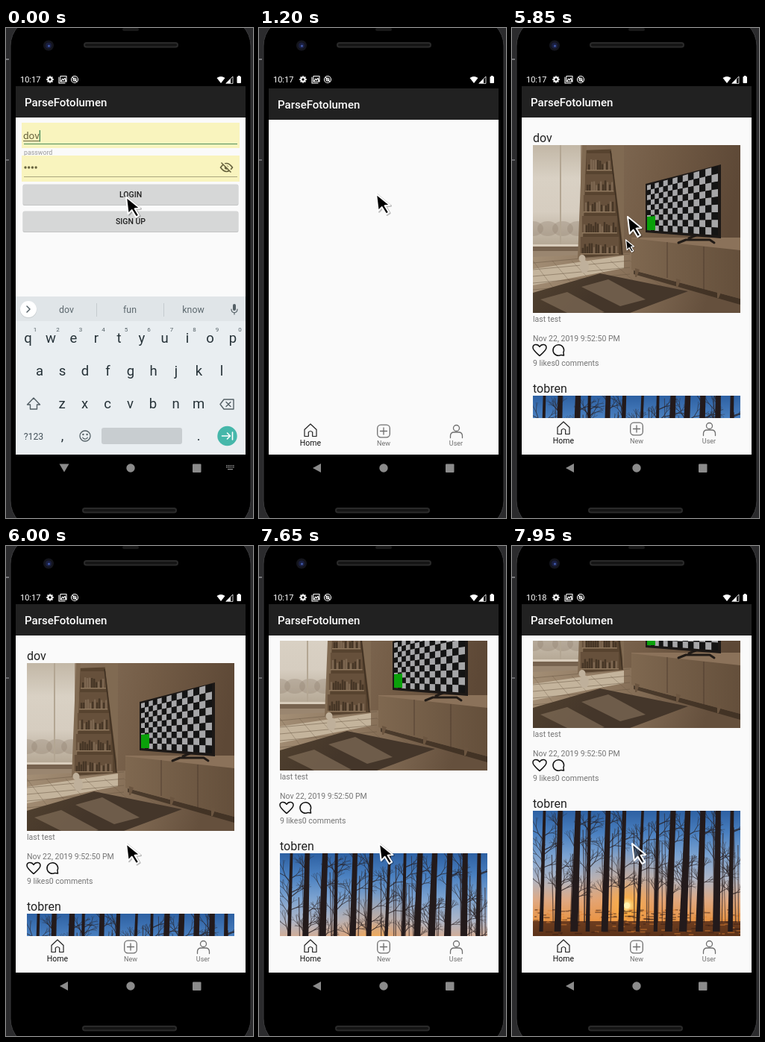
An HTML page with a canvas for the animation above (8000 ms loop, 331 by 657 pixels).

```html
<!DOCTYPE html>
<html lang="en">
<head>
<meta charset="utf-8">
<title>ParseFotolumen</title>
<style>
html, body { margin: 0; width: 100%; height: 100%; overflow: hidden; background: #000; }
canvas { display: block; width: 331px; height: 657px; }
</style>
</head>
<body>
<canvas id="stage" width="331" height="657"></canvas>
<script>
const LOOP = 8000;
const USER = 'dov', FRIEND = 'tobren', APP = 'ParseFotolumen';
const IMG_W = 278, IMG_H = 225;
const stage = document.getElementById('stage').getContext('2d');
let c = stage;

const mix = (a, b, t) => a + (b - a) * t;

function seeded(seed) {
  return () => {
    seed = (seed * 16807) % 2147483647;
    return seed / 2147483647;
  };
}

function repeat(n, fn) {
  for (let i = 0; i < n; i++) fn(i);
}

function box(x, y, w, h, fill, r = 0) {
  c.fillStyle = fill;
  c.beginPath();
  c.roundRect(x, y, w, h, r);
  c.fill();
}

// Four-sided face with upright left and right edges.
function face(fill, x0, top0, end0, x1, top1, end1) {
  c.fillStyle = fill;
  c.beginPath();
  c.moveTo(x0, top0);
  c.lineTo(x1, top1);
  c.lineTo(x1, end1);
  c.lineTo(x0, end0);
  c.fill();
}

function line(color, width, x0, y0, x1, y1) {
  c.strokeStyle = color;
  c.lineWidth = width;
  c.beginPath();
  c.moveTo(x0, y0);
  c.lineTo(x1, y1);
  c.stroke();
}

function disc(x, y, r, fill) {
  c.fillStyle = fill;
  c.beginPath();
  c.arc(x, y, r, 0, 7);
  c.fill();
}

function ring(x, y, r, color, width, a = 0, b = 2 * Math.PI) {
  c.strokeStyle = color;
  c.lineWidth = width;
  c.beginPath();
  c.arc(x, y, r, a, b);
  c.stroke();
}

function path(d, x, y, color, width, fill) {
  const p = new Path2D(d);
  c.save();
  c.translate(x, y);
  c.lineJoin = c.lineCap = 'round';
  if (fill) { c.fillStyle = fill; c.fill(p); }
  if (width) { c.strokeStyle = color; c.lineWidth = width; c.stroke(p); }
  c.restore();
}

function text(s, x, y, size, color, align = 'left', weight = 400) {
  c.font = `${weight} ${size}px Roboto, sans-serif`;
  c.textAlign = align;
  c.fillStyle = color;
  c.fillText(s, x, y);
}

function fade(x0, y0, x1, y1, ...colors) {
  const g = c.createLinearGradient(x0, y0, x1, y1);
  colors.forEach((col, i) => g.addColorStop(i / (colors.length - 1), col));
  return g;
}

function picture(draw) {
  const cv = document.createElement('canvas');
  cv.width = IMG_W;
  cv.height = IMG_H;
  c = cv.getContext('2d');
  draw();
  c = stage;
  return cv;
}

function drawWindow() {
  box(0, 0, 69, 150, '#9a8670');
  box(0, 0, 64, 134, fade(0, 0, 0, 134, '#c2b7a6', '#d9d1c4', '#d6cdc0', '#b5a895'));
  repeat(4, i => {
    c.fillStyle = 'rgba(140,124,106,.3)';
    c.beginPath();
    c.ellipse(i * 20, 112, 14, 10, 0, 0, 7);
    c.fill();
  });
  box(36, 0, 2, 134, '#b3a693');
  box(0, 133, 68, 3, '#d8ccbb');
  box(0, 136, 68, 6, '#77634f');
}

function drawFloor() {
  face(fade(0, 145, 230, 220, '#a38e75', '#8a735b', '#65503d'), 0, 150, IMG_H, IMG_W, 138, IMG_H);
  face('#c4b49c', 0, 166, 188, 122, 148, 165);
  repeat(6, i => {
    line('rgba(105,86,67,.5)', 1, 0, 158 + i * 9, 130, 146 + i * 9);
    line('rgba(105,86,67,.35)', 1, i * 26, 155, 30 + i * 30, 195);
  });
  path('M0 198 L90 172 L208 196 L130 225 H0 Z', 0, 0, '', 0, fade(0, 172, 60, 225, '#51412f', '#44362a'));
  repeat(2, i => path('M0 0 L36 -10 L86 17 L52 26 Z', 10 + i * 55, 207 - i * 17, '', 0, 'rgba(133,113,91,.65)'));
}

function drawShelf(rnd) {
  face('#57432f', 66, 7, 151, 120, 5, 147);
  c.save();
  // the sides lean together towards the top
  const side = (y, s) => 88 + s * mix(16, 29, y / 150);
  path('M66 0 H72 L66 152 H60 Z M104 0 H122 V148 Z', 0, 0, '', 0, '#806a52');
  repeat(5, i => {
    const y = 33 + i * 28, l = side(y, -0.85), r = side(y, 0.95);
    box(l, y - 22, r - l, 22, '#66503b');
    for (let x = l + 2; x < r - 3; x += 3) {
      const h = 7 + rnd() * 7;
      box(x, y - h, 2.4, h, rnd() < 0.6 ? '#463626' : '#7d6751');
    }
    line('#8f785e', 1.6, l, y + 0.8, r, y + 0.8);
  });
  line('#3f3022', 1.5, 104, 8, 120, 147);
  c.restore();
}

function drawCabinet() {
  face('rgba(52,39,28,.7)', 135, 168, 173, IMG_W, 206, 214);
  face('#8b725a', 132, 124, 126, IMG_W, 124, 142);
  face(fade(132, 0, IMG_W, 0, '#7f6850', '#644f3b'), 132, 125, 167, IMG_W, 141, 206);
  repeat(2, i => line('rgba(62,46,34,.6)', 1, 180 + i * 49, 130 + i * 6, 180 + i * 49, 178 + i * 15));
  repeat(3, i => path('M0 0 L6 2 L2 12 H0 Z', 137 + i * 55, 165 + i * 14, '', 0, '#6b5540'));
}

// Point on the tilted screen, u and v in 0..1.
function screenPoint(u, v) {
  const t = u * (0.72 + 0.28 * u);
  return [mix(153, 248, t), mix(mix(54, 28, t), mix(114, 121, t), v)];
}

function drawScreen() {
  path('M0 8 L10 4 H42 L48 8 M14 2 L28 -4', 195, 123, '#211b17', 3);
  face('#1c1816', 151, 52, 117, 252, 26, 125);
  const cols = 14, rows = 9;
  repeat(cols * rows, n => {
    const i = n % cols, j = Math.floor(n / cols);
    const [x0, top0] = screenPoint(i / cols, j / rows), [x1, top1] = screenPoint((i + 1) / cols, j / rows);
    const end0 = screenPoint(i / cols, (j + 1) / rows)[1], end1 = screenPoint((i + 1) / cols, (j + 1) / rows)[1];
    face((i + j) % 2 ? '#141414' : '#a6a6a8', x0, top0, end0, x1, top1, end1);
  });
  face('#0aa00a', 153, 96, 114, 164, 95, 114);
}

function drawRoom() {
  box(0, 0, IMG_W, IMG_H, fade(60, 0, IMG_W, 40, '#86705a', '#735c46', '#5d4836'));
  drawWindow();
  drawFloor();
  drawShelf(seeded(41));
  // small pet by the window
  c.fillStyle = '#bfb09b';
  c.beginPath();
  c.ellipse(69, 163, 6, 9, 0, 0, 7);
  c.ellipse(66, 152, 4.5, 5, 0, 0, 7);
  c.fill();
  drawCabinet();
  drawScreen();
}

function branch(x, y, len, ang, depth, rnd) {
  const x2 = x + Math.cos(ang) * len, y2 = y + Math.sin(ang) * len;
  line('rgba(38,29,30,.8)', 0.4 + depth * 0.25, x, y, x2, y2);
  if (!depth) return;
  branch(x2, y2, len * 0.8, ang - 0.1 - rnd() * 0.5, depth - 1, rnd);
  branch(x2, y2, len * 0.8, ang + 0.1 + rnd() * 0.5, depth - 1, rnd);
}

function drawWoods() {
  const rnd = seeded(977), sunX = 126, sunY = 127;
  box(0, 0, IMG_W, IMG_H, fade(0, 0, 0, 150, '#2d60a2', '#4a80c0', '#7ba2d0', '#adb6c8', '#dfa983', '#e8923f'));
  const glow = c.createRadialGradient(sunX, sunY, 2, sunX, sunY, 80);
  ['#fff0a0', 'rgba(255,176,60,.75)', 'rgba(240,150,70,.3)', 'rgba(240,150,70,0)']
    .forEach((col, i) => glow.addColorStop(i * i / 9, col));
  c.fillStyle = glow;
  c.fillRect(0, 0, IMG_W, IMG_H);
  // leafy ground and hazy undergrowth
  box(0, 148, IMG_W, 77, fade(0, 148, 0, 225, '#6e3d1f', '#4a2814', '#2e1a10'));
  repeat(260, () => {
    const x = rnd() * IMG_W, y = 132 + rnd() * rnd() * 80;
    box(x, y, 2 + rnd() * 8, 1.6, rnd() < 0.4 ? 'rgba(222,130,52,.5)' : 'rgba(56,30,20,.5)');
  });
  repeat(30, () => {
    const x = rnd() * IMG_W;
    line('rgba(48,34,34,.65)', 0.6 + rnd(), x, rnd() * 60, x + rnd() * 6 - 3, 150);
  });
  repeat(13, i => {
    const x = 9 + i * 21.2 + rnd() * 8, w = 3.5 + rnd() * 4, lean = 2 + rnd() * 5;
    face('#231a1b', x + lean - w / 2, 0, 0, x + lean + w / 2, 0, 0);
    path(`M${lean - w / 2} 0 h${w} L${w * 0.7} 162 H${-w * 0.7} Z`, x, 0, '', 0, '#231a1b');
    repeat(9, k => {
      const y = 8 + rnd() * 112, ang = k % 2 ? -0.9 : Math.PI + 0.9;
      branch(x + lean * (1 - y / 162), y, 6 + rnd() * 6, ang + rnd() * 0.6, 3, rnd);
    });
  });
  disc(sunX, sunY, 4, '#fff3b0');
}

const room = picture(drawRoom), woods = picture(drawWoods);

function phone() {
  box(0, 0, 331, 657, '#2b2b2d');
  box(0, 41, 4, 2, '#77777a');
  box(0, 176, 4, 2, '#66666a');
  box(6, -14, 322, 686, '#000', 38);
  c.strokeStyle = '#3b3b3d';
  c.lineWidth = 1;
  c.stroke();
  box(156, 0, 22, 4, '#191919', 2);
  disc(57, 23.5, 7, '#14151d');
  disc(57, 23.5, 4, '#1a1f40');
  disc(57.5, 24, 1.6, '#4058a8');
  for (const [x, y] of [[104, 19], [102, 643]]) {
    box(x, y, 127, 7.5, '#2a2a2a', 4);
    box(x + 2, y + 2, 123, 3.5, '#151515', 2);
  }
}

function statusBar(clock) {
  const w = '#fff';
  box(13, 60, 308, 18, '#000');
  text(clock, 19, 73, 11, w);
  ring(59, 69, 2.7, w, 2);
  repeat(8, i => {
    const a = i * Math.PI / 4;
    ring(59, 69, 4, w, 1.6, a - 0.2, a + 0.2);
  });
  path('M-5 -3 V5 H3 M-3 -4.5 H5 V3 H-3 Z M-2 2 L0 -1 L1 1 L3 -2 L4 2', 76, 69, w, 1.1);
  ring(92, 69, 4.5, w, 1.1);
  ring(92, 69, 2, w, 1.1);
  line(w, 1.1, 89, 66, 95, 72);
  path('M0 4.5 L-5.5 -2.5 Q0 -6.5 5.5 -2.5 Z', 288, 69.5, '', 0, w);
  path('M0 0 L6 -6 V0 Z', 295, 74, '', 0, w);
  path('M0 0 L9 -9 V0 Z', 295, 74, w, 0.8);
  box(309.5, 65, 5.5, 9, w, 1);
  box(311, 64, 2.5, 2, w);
}

function titleBar() {
  box(13, 78, 308, 42, '#212121');
  text(APP, 25, 105, 15, '#fff', 'left', 500);
}

function navBar(back, keys) {
  const g = '#8b8b8b';
  box(13, 572, 308, 36, '#000');
  path(back ? 'M-5.5 0 L5.5 -6 V6 Z' : 'M-6 -5.5 H7 L.5 5.5 Z', 77.5, 590, '', 0, g);
  disc(167, 590, 5.7, g);
  box(250, 584.5, 11.5, 11.5, g, 1);
  if (!keys) return;
  repeat(10, i => box(295 + (i % 5) * 2.3, i < 5 ? 586 : 588.3, 1.4, 1.4, g));
  box(297, 591, 7, 1.3, g);
}

function button(label, y, fill) {
  box(22.5, y + 0.5, 289, 28, '#c4c5c5', 2);
  box(23, y, 288, 27.5, fill, 2);
  text(label, 167, y + 17.5, 10.5, '#202020', 'center', 500);
}

function login(t) {
  const focus = t >= 300, pressed = focus && t < 450;
  const ink = '#68643f', yellow = '#f9f4be';
  box(13, 120, 308, 452, '#fafafa');
  titleBar();
  box(21, 127, 292, 34, yellow);
  text(USER, 23, 149, 13.5, ink);
  const end = 23 + c.measureText(USER).width;
  if (!focus) line(ink, 1, 23, 151.5, end, 151.5);
  line('#2f7d4f', 1.2, end + 0.6, 137, end + 0.6, 152.5);
  line(focus ? '#4caf6a' : '#4d8f5c', focus ? 1.5 : 1.2, 24, 155.5, 310, 155.5);
  text('password', 24, 169.5, 8.8, '#999');
  box(21, 171, 292, 35, yellow);
  repeat(4, i => disc(26 + i * 4.7, 187, 1.7, ink));
  line('#aba77e', 1, 24, 199.5, 310, 199.5);
  path('M-8 0 Q0 -11 8 0 Q0 11 -8 0 Z', 295.5, 187, ink, 1.7);
  disc(295.5, 187, 2.7, ink);
  line(yellow, 2, 290, 180, 303, 193);
  line(ink, 1.5, 288.5, 180.5, 301.5, 193.5);
  button('LOGIN', 209.5, pressed ? '#c3c4c4' : '#d6d7d7');
  button('SIGN UP', 245.5, '#d6d7d7');
}

function keyRow(keys, x, y, size = 18.5, color = '#263238') {
  [...keys].forEach((k, i) => text(k, x + i * 30.5, y, size, color, 'center'));
}

function keyboard() {
  const ink = '#546066', dark = '#263238';
  box(13, 360, 308, 212, '#e9eef1');
  box(13, 360, 308, 33, '#e0e5e8');
  disc(30, 377.8, 11.3, '#c9ced1');
  disc(30, 377, 11, '#fff');
  path('M-2 -4 L2 0 L-2 4', 30, 377, ink, 1.5);
  [USER, 'fun', 'know'].forEach((s, i) => {
    text(s, 81 + i * 85, 381.5, 12.3, '#5c686e', 'center');
    if (i) line('#c5cbcf', 1, 31.5 + i * 90, 369, 31.5 + i * 90, 387);
  });
  box(304, 370, 4, 9, ink, 2);
  path('M-4 0 Q-4 4.5 0 4.5 Q4 4.5 4 0 M0 4.5 V7', 306, 377, ink, 1.2);
  keyRow('qwertyuiop', 29.5, 422);
  keyRow('1234567890', 39, 407, 8, ink);
  keyRow('asdfghjkl', 45, 465.5);
  keyRow('zxcvbnm', 75, 510);
  path('M0 -8 L8.5 1 H4.5 V7 H-4.5 V1 H-8.5 Z', 37, 504, ink, 1.4);
  path('M-9 0 L-4 -6.5 H9 V6.5 H-4 Z M-1 -3 L5 3 M5 -3 L-1 3', 296, 504.5, ink, 1.4);
  text('?123', 37, 551.5, 12.3, '#45525a', 'center');
  text(',', 75.5, 553, 18, dark, 'center');
  text('.', 258, 553, 18, dark, 'center');
  ring(106, 547, 7, ink, 1.3);
  disc(103.4, 545, 1.2, ink);
  disc(108.6, 545, 1.2, ink);
  ring(106, 547.5, 3.6, ink, 1.2, 0.3, Math.PI - 0.3);
  box(128, 536, 108, 22, '#c8cdd0', 3);
  disc(296.5, 547, 13.2, '#45b7aa');
  path('M-7 0 H4 M0 -4 L4 0 L0 4 M7 -5 V5', 296.5, 547, '#fff', 1.6);
}

function post(y, name, img) {
  const gray = '#757575';
  text(name, 28, y + 25.5, 16, '#212121');
  c.drawImage(img, 28, y + 30);
  text('last test', 28, y + 266.5, 10.5, gray);
  text('Nov 22, 2019 9:52:50 PM', 28, y + 293, 10.5, gray);
  path('M0 7.5 C-4 4 -9 0 -9 -3.5 C-9 -8.5 -2.5 -9 0 -4.5 C2.5 -9 9 -8.5 9 -3.5 C9 0 4 4 0 7.5 Z', 37, y + 305, '#111', 1.5);
  path('M7 7 L3.2 6.4 A7.3 7.3 0 1 1 6.4 3 Z', 62.5, y + 305, '#111', 1.5);
  text('9 likes0 comments', 28, y + 325.5, 10.5, gray);
}

function tabs() {
  const gray = '#6f6f6f';
  box(13, 523, 308, 49, '#fafafa');
  path('M-8 -1 L0 -8.5 L8 -1 V8 H2.7 V2.5 Q0 -0.5 -2.7 2.5 V8 H-8 Z', 69, 536.5, '#222', 1.2);
  text('Home', 69, 557, 10.5, '#111', 'center');
  c.strokeStyle = gray;
  c.lineWidth = 1.3;
  c.beginPath();
  c.roundRect(158.7, 529.2, 16.6, 16.6, 4.5);
  c.stroke();
  path('M-4.5 0 H4.5 M0 -4.5 V4.5', 167, 537.5, gray, 1.3);
  text('New', 167, 557, 9, gray, 'center');
  ring(264.5, 533.5, 4, gray, 1.3);
  path('M-8 5 V2.5 Q-8 -2.5 -3 -2.5 H3 Q8 -2.5 8 2.5 V5', 264.5, 541.5, gray, 1.3);
  text('User', 264, 557, 9, gray, 'center');
}

function feed(scroll, loaded) {
  box(13, 120, 308, 452, '#fafafa');
  titleBar();
  if (loaded) {
    c.save();
    c.beginPath();
    c.rect(27, 127, 280, 396);
    c.clip();
    post(127 - scroll, USER, room);
    post(463 - scroll, FRIEND, woods);
    c.restore();
  }
  tabs();
}

function pointer(x, y, scale = 1, fill = '#000') {
  c.save();
  c.translate(x, y);
  c.scale(scale, scale);
  c.rotate(-0.12);
  const arrow = 'M0 0 V23 L5.4 18.4 L10 28.5 L14 26.6 L9.6 17 H16.5 Z';
  if (fill === '#000') path(arrow, 1.2, 1.2, 'rgba(0,0,0,.25)', 2.5);
  path(arrow, 0, 0, '#fff', 2, fill);
  c.restore();
}

// Values of the last step whose start time has passed.
const at = (steps, t) => steps.filter(s => t >= s[0]).pop().slice(1);

const scrolls = [[0, 0], [7500, 30], [7650, 81], [7800, 112], [7950, 138]];
const pointers = [[0, 161, 226.5], [150, 157, 222.5], [5850, 155, 253], [6000, 161, 399]];
const entry = [[1050, 0.6, 18], [1200, 1, 3], [1350, 1, 0]];

function render(t) {
  phone();
  c.save();
  c.beginPath();
  c.rect(13, 60, 308, 548);
  c.clip();
  if (t < 1200) login(t);
  if (t < 1050) {
    keyboard();
  } else {
    const [alpha, shift] = at(entry, t);
    c.save();
    c.globalAlpha = alpha;
    c.translate(0, shift);
    feed(at(scrolls, t)[0], t >= 1350);
    c.restore();
  }
  statusBar(t < 7800 ? '10:17' : '10:18');
  navBar(t >= 1050, t < 900);
  c.restore();
  pointer(...at(pointers, t), 1, t < 7950 ? '#000' : 'rgba(0,0,0,.4)');
  if (t >= 5850 && t < 6000) pointer(152.5, 284, 0.6);
}

function tick(now) {
  render(now % LOOP);
  requestAnimationFrame(tick);
}
requestAnimationFrame(tick);
</script>
</body>
</html>
```
